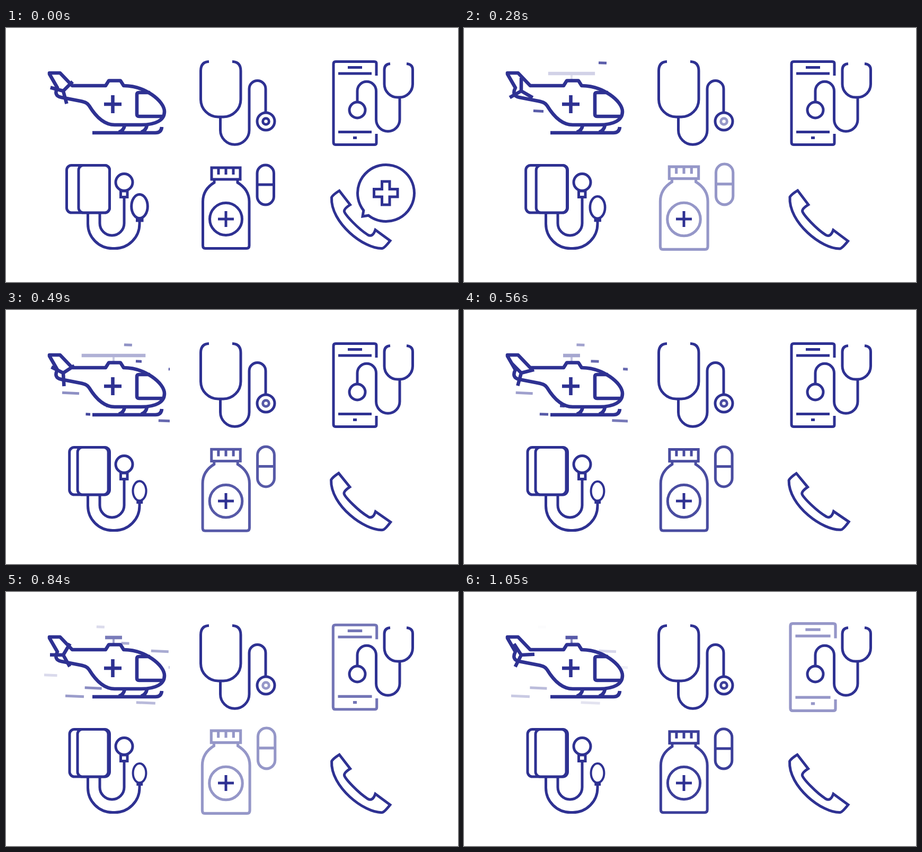
An HTML page for the animation above (1120 ms loop, 853x480 px).

```html
<!DOCTYPE html>
<html lang="en">
<head>
<meta charset="utf-8">
<title>Medical icons</title>
<style>
  html, body { margin: 0; height: 100%; overflow: hidden; background: #fff; }
  svg { display: block; fill: none; stroke: #2e3192; stroke-width: 5; }
  .solid { fill: #fff; }
  .bold { stroke-width: 6.6; }
</style>
</head>
<body>
<svg width="853" height="480" viewBox="0 0 853 480">
  <clipPath id="sky"><rect x="72" y="55" width="237" height="165"/></clipPath>

  <!-- helicopter -->
  <g id="streaks" clip-path="url(#sky)"></g>
  <g id="rotor" class="bold">
    <path d="M203 89V97" stroke-width="4" opacity=".7"/>
    <path id="blade"/>
  </g>
  <g class="bold">
    <path class="solid" stroke-linejoin="round" d="M82 85H102L125 109H188L194 99.500H216L222 109C262 109 299 138 299 158C299 174 283 183 255 183H205C183 183 168 165 157 147C153 141 149 140 140 138L104 131C94 129 92 122 97 113L82 87Z"/>
    <path d="M272 122H251Q247 122 247 126V163Q247 167 251 167H297M185 144H218M201.500 127V161"/>
    <path d="M163 198H282Q293 198 294 187M224 184Q222 194 213 197M266 184Q264 194 255 197"/>
    <path id="tail" d="M0 0H25M0 0L-12.500 21.650M0 0L-12.500 -21.650"/>
  </g>

  <!-- stethoscope -->
  <path d="M383 63.500Q367.500 64 367.500 81V135A33 33 0 0 0 400.500 168H410A33 33 0 0 0 443 135V81Q443 64 427 63.500M404.500 168V193A27.250 27.250 0 0 0 459 193V115A15.500 15.500 0 0 1 490 115V160"/>
  <circle cx="490.500" cy="176.500" r="16.500"/>
  <circle id="ring" cx="490.500" cy="176.500" r="5.800"/>

  <!-- phone with stethoscope -->
  <path id="phone" d="M699 90V67Q699 63.500 695 63.500H622Q618 63.500 618 68V216Q618 220.500 622 220.500H695Q699 220.500 699 217V200M645 74.500H672M627 86H690M627 196.500H690M655 207.500H662"/>
  <g id="scope">
    <path d="M725 67.500Q714 68.500 714 79V106A25 25 0 0 0 739 131H742.500A25 25 0 0 0 767.500 106V79Q767.500 68.500 756 67.500M743 131V173A22.250 22.250 0 0 1 698.500 173V119A17.750 17.750 0 0 0 663 119V140"/>
    <circle class="solid" cx="663" cy="155" r="15"/>
  </g>

  <!-- blood pressure cuff -->
  <path d="M154.500 349V370A46.500 46.500 0 0 0 201 416.500H205.500A46.500 46.500 0 0 0 252 370V364M177 349V369A23 23 0 0 0 223 369V320"/>
  <rect id="back" class="solid" y="259.500" height="89.500" rx="9"/>
  <rect id="front" class="solid" y="259.500" height="89.500" rx="9"/>
  <circle cx="223" cy="291.500" r="16"/>
  <rect class="solid" x="216.500" y="308" width="12.500" height="11.500"/>
  <g id="bulb">
    <rect class="solid" x="247.500" y="356" width="9.500" height="8"/>
    <ellipse class="solid" cx="252" cy="337" rx="15.300" ry="22.500"/>
  </g>

  <!-- pills -->
  <g id="bottle">
    <path d="M388 264H442V286H388ZM401 264V277M415 264V277M429 264V277M393 286V292C380 300 371.500 312 371.500 328V411Q371.500 416.500 376 416.500H454Q459 416.500 459 411V328C459 312 450 300 437 292V286"/>
    <circle cx="415" cy="361" r="30.500"/>
    <rect x="474" y="259" width="31.500" height="75" rx="15.750"/>
    <path d="M474 296H505.500"/>
  </g>
  <path d="M400 361H430M415 346V376"/>

  <!-- emergency call -->
  <path id="handset" d="M629 307.500L649.500 334Q637 342 638.500 347C641 354 664 379 683 391Q692 396 697 381.500L725 402Q714 416 710 416.500C676 418 612 368 614.500 320Q617 315 629 307.500Z"/>
  <path id="bubble" d="M674.800 344.900A53.500 53.500 0 1 1 684.100 354.200L673 356ZM709.500 290H724V304.500H739V319H724V334H709.500V319H694.500V304.500H709.500Z"/>
</svg>
<script>
const STEP = 70, STEPS = 16;
const $ = id => document.getElementById(id);
const set = (el, attrs) => { for (const name in attrs) el.setAttribute(name, attrs[name]); };
const clamp = v => Math.max(0, Math.min(1, v));
const smooth = v => clamp(v) ** 2 * (3 - 2 * clamp(v));
const bump = (k, peak) => clamp(1 - Math.abs(k - peak) / 2);
const wave = degrees => Math.sin(degrees * Math.PI / 180);
const zoom = (x, y, s) => `translate(${x} ${y}) scale(${s}) translate(${-x} ${-y})`;

// Wind lines grow out of a fixed point, drift left and fade.
const streaks = [
  { y: 66, len: 15, from: 279, born: 1.6, speed: 10.4 },
  { y: 97, len: 15, from: 256, born: 5, speed: 5.5 },
  { y: 112, len: 33, from: 320, born: 5, speed: 6.6 },
  { y: 143, len: 32, from: 340, born: 3, speed: 3.7 },
  { y: 157, len: 32, from: 150, born: 1.7, speed: 8.3 },
  { y: 181.5, len: 32, from: 190, born: 6.9, speed: 8.1 },
  { y: 197, len: 35, from: 159, born: 5.9, speed: 7.7 },
  { y: 209.5, len: 36, from: 313, born: 4, speed: 8.4 }
];
for (const s of streaks) {
  s.el = document.createElementNS("http://www.w3.org/2000/svg", "line");
  $("streaks").append(s.el);
}

function drawStreak(s, k) {
  const age = Math.max(0, k - s.born);
  const x = s.from - s.speed * age;
  const end = Math.min(x + s.len, s.from);
  const tilt = (end - x) * 0.02;
  set(s.el, { x1: x, x2: end, y1: s.y - tilt, y2: s.y + tilt, opacity: clamp(1 - age / 14) ** 1.3 });
}

function drawHelicopter(k) {
  streaks.forEach(s => drawStreak(s, k));
  const reach = 66 * Math.abs(wave(52 * (k - 10) + 90));
  set($("blade"), { d: `M${203 - reach} 86H${203 + reach}` });
  set($("rotor"), { opacity: 0.053 * k });
  set($("tail"), { transform: `translate(108 119) rotate(${75 + 18.8 * k})` });
}

function drawPulse(k) {
  const beat = 7.6;
  const gap = Math.abs(k - beat * Math.round(k / beat));
  const glow = Math.max(0.5, 1 - 0.33 * gap);
  set($("ring"), { opacity: glow });
  set($("bottle"), { opacity: glow, transform: zoom(415, 340, 1.05 - 0.05 * glow) });
}

function drawPhone(k) {
  set($("phone"), {
    opacity: 1 - 0.5 * clamp((k - 10) / 3),
    transform: zoom(658.5, 142, 1 + 0.05 * clamp((k - 10.5) / 4.5))
  });
  const rock = 1.7 * (bump(k, 2) - bump(k, 10));
  set($("scope"), { transform: `rotate(${rock} 708 130)` });
}

function drawCuff(k) {
  const p = smooth((k - 1) / 7);
  const left = 114.5 + 5.5 * p, inner = 137 - 2 * p;
  set($("back"), { x: left, width: 195.5 - left });
  set($("front"), { x: inner, width: 195.5 - 2.5 * p - inner });
  set($("bulb"), { transform: zoom(252, 364, 1 - 0.19 * p) });
}

function drawCall(k) {
  const ring = 1.9 * clamp(k / 8) * wave(62 * (k - 9) - 10);
  set($("handset"), { transform: `rotate(${ring} 668 365)` });
  set($("bubble"), { opacity: k === 0 ? 1 : 0 });
}

function draw(k) {
  drawHelicopter(k);
  drawPulse(k);
  drawPhone(k);
  drawCuff(k);
  drawCall(k);
}

let start;
function tick(now) {
  start ??= now;
  draw(Math.floor((now - start) / STEP) % STEPS);
  requestAnimationFrame(tick);
}
draw(0);
requestAnimationFrame(tick);
</script>
</body>
</html>
```
